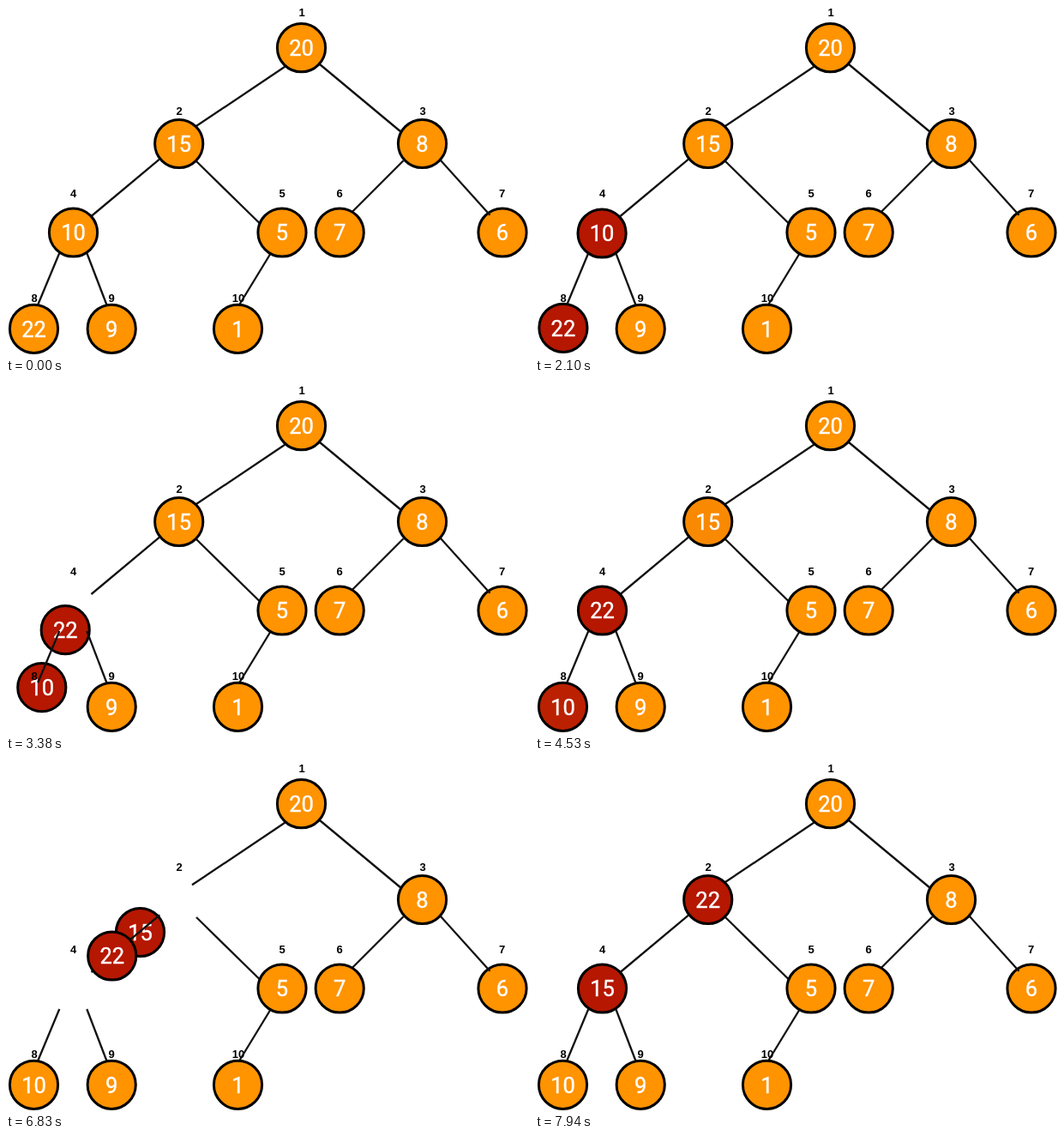
These frames come from a looping animation (610x408 px, 8000 ms). An HTML page:

```html
<!DOCTYPE html>
<html lang="en">
<head>
<meta charset="utf-8">
<title>Heap swaps</title>
<style>
html, body { margin: 0; width: 100%; height: 100%; overflow: hidden; background: #fff; }
svg { display: block; }
text { text-anchor: middle; }
.node circle { fill: #ff9300; stroke: #000; stroke-width: 3; }
.node text { font: 25.5px Roboto, Arial, sans-serif; fill: #fff; stroke: #fff; stroke-width: .4; }
.edge { stroke: #111; stroke-width: 2.3; }
.label { font: bold 13px "Liberation Sans", Arial, sans-serif; }
</style>
</head>
<body>
<svg id="stage" width="610" height="408" viewBox="0 0 610 408"></svg>
<script>
const LOOP = 8000, STEP = 70;
const ORANGE = [255, 147, 0], RED = [181, 23, 0];
// Spans in which the picture advances every STEP ms; it holds in between.
const SPANS = [[350, 1120], [1190, 1750], [2030, 2310], [2480, 2760], [2930, 3000],
  [3170, 3380], [3550, 3970], [4320, 5090], [5160, 5720], [6100, 6660],
  [6830, 6900], [7070, 7210], [7380, 7940]];
const TOP = [201.7, 160.5], MID = [78.5, 264], LOW = [32.5, 376.3];

const stage = document.getElementById('stage');

function add(parent, tag, attrs, text) {
  const el = document.createElementNS('http://www.w3.org/2000/svg', tag);
  for (const key in attrs) el.setAttribute(key, attrs[key]);
  if (text !== undefined) el.textContent = text;
  parent.appendChild(el);
  return el;
}

function edge(x1, y1, x2, y2) {
  add(stage, 'line', { class: 'edge', x1, y1, x2, y2 });
}

function label(text, x, y) {
  add(stage, 'text', { class: 'label', x, y: y + 4.7 }, text);
}

function node(value, [x, y]) {
  const g = add(stage, 'g', { class: 'node', transform: `translate(${x} ${y})` });
  const disc = add(g, 'circle', { r: 28.1 });
  add(g, 'text', { y: 9.2 }, value);
  return { g, disc };
}

// Back to front: the moving discs pass under some edges and over others.
edge(326, 70.3, 217, 143.3);
edge(366, 68, 461, 147);
edge(222, 181, 296.3, 253.7);
edge(463.5, 180.3, 403.5, 240.3);
edge(308.3, 289, 272.3, 348);
node(20, [344.5, 48.7]);
node(8, [485.5, 160.5]);
node(5, [322, 264]);
node(7, [389.2, 264]);
node(6, [579, 264]);
node(9, [123.2, 376.3]);
node(1, [270.5, 376.3]);
const n15 = node(15, TOP);
const n10 = node(10, MID);
edge(179.3, 178.3, 99.5, 245);
const n22 = node(22, LOW);
edge(62.3, 288, 37.3, 348);
edge(94.3, 288, 117.3, 348);
edge(507, 180, 564.5, 243.7);
label(1, 345, 7.5);
label(2, 202, 122.5);
label(3, 486, 122.5);
label(4, 78.7, 218);
label(5, 322, 218);
label(6, 389, 218);
label(7, 578.7, 218);
label(8, 33, 340);
label(9, 123, 340);
label(10, 271, 340);

function ease(t, from, to) {
  const p = Math.min(1, Math.max(0, (t - from) / (to - from)));
  return (1 - Math.cos(Math.PI * p)) / 2;
}

const mix = (a, b, p) => a.map((v, i) => v + (b[i] - v) * p);

function snap(t) {
  let time = 0;
  for (const [from, to] of SPANS) {
    if (t >= from) time = from + Math.floor((Math.min(t, to) - from) / STEP) * STEP;
  }
  return time;
}

function pose({ g, disc }, pos, heat) {
  g.setAttribute('transform', `translate(${pos.map(v => v.toFixed(2)).join(' ')})`);
  disc.style.fill = `rgb(${mix(ORANGE, RED, heat).map(Math.round).join(',')})`;
}

function draw(ms) {
  const t = snap(ms % LOOP);
  const heat = ease(t, 300, 1750);
  const swapLow = ease(t, 1980, 3970);
  const shift = ease(t, 4270, 5720);
  const swapTop = ease(t, 6045, 7940);
  pose(n10, mix(MID, LOW, swapLow), heat - shift);
  pose(n15, mix(TOP, MID, swapTop), shift);
  pose(n22, swapTop > 0 ? mix(MID, TOP, swapTop) : mix(LOW, MID, swapLow), heat);
}

const start = performance.now();
function tick() {
  draw(performance.now() - start);
  requestAnimationFrame(tick);
}
tick();
</script>
</body>
</html>
```
